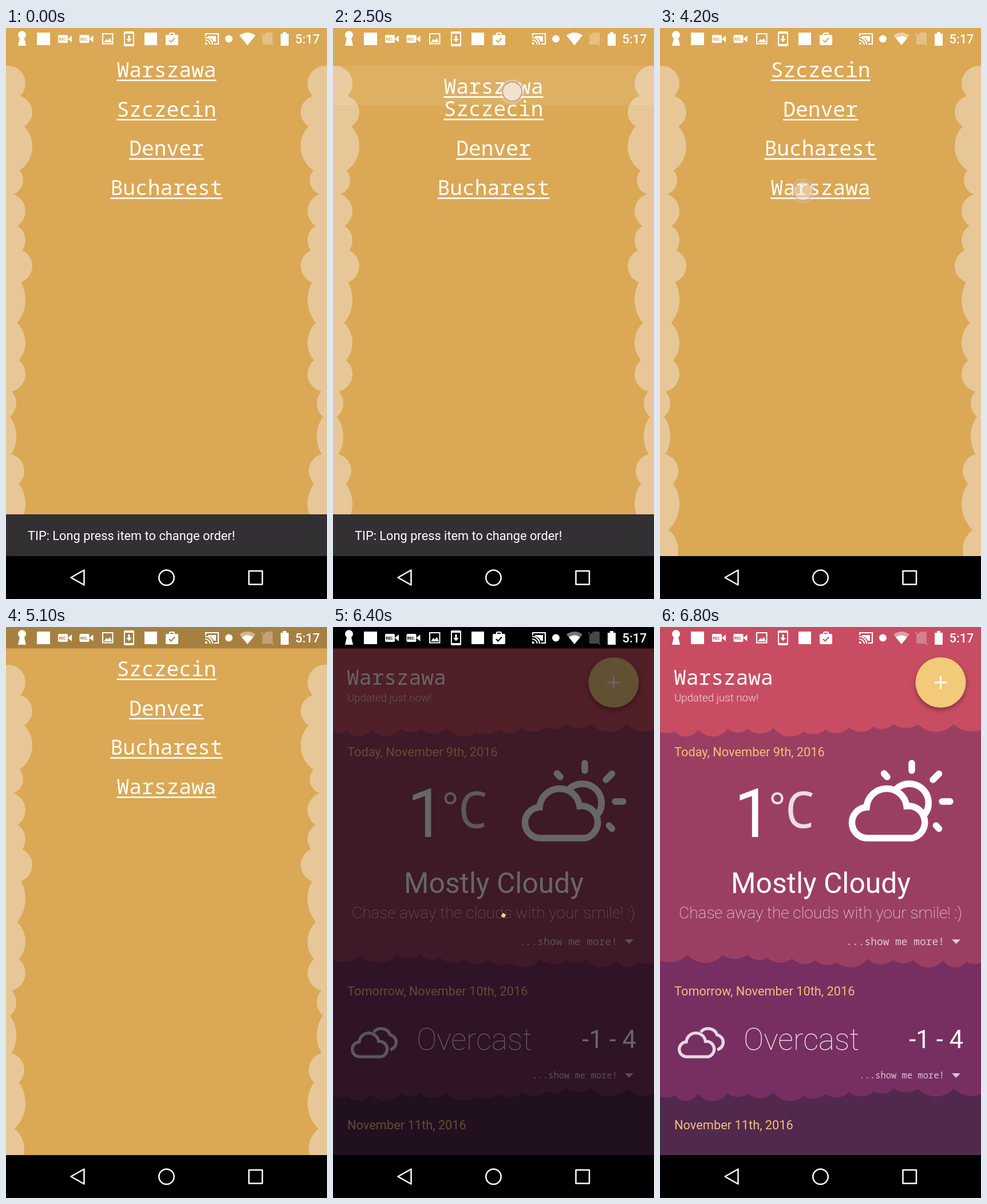
Recreate the animation shown at these times as an HTML page. Size 561 px wide and 998 px high, loop 6900 ms.

```html
<!DOCTYPE html>
<html lang="en">
<head>
<meta charset="utf-8">
<title>Reordering cities</title>
<style>
  html, body { margin: 0; width: 100%; height: 100%; overflow: hidden; background: #000; }
  svg { display: block; width: 100%; height: 100%; }
  text { font-family: Roboto, sans-serif; fill: #fff; white-space: pre; }
  .mono { font-family: "Noto Sans Mono", monospace; font-weight: 300; }
  .date { font-size: 21.8px; fill: #f0c178; }
  .more { text-anchor: end; opacity: .72; }
  .line { fill: none; stroke: #fff; }
  .rec { font: 700 6.5px Roboto, sans-serif; }
  .cut { fill: var(--bar); }
  .unit { font-weight: 400; text-anchor: middle; opacity: .82; }
  .fab { filter: drop-shadow(0 4px 4px rgba(0, 0, 0, .35)); }
</style>
</head>
<body>
<svg viewBox="0 0 561 998" preserveAspectRatio="none">
  <defs>
    <path id="cloud" d="M364 369A27 27 0 0 1 361 315A35.2 35.2 0 0 1 431 313A28.5 28.5 0 0 1 441 369Z"/>
    <g id="camera">
      <rect x="91" y="12" width="17" height="14" rx="2"/>
      <path d="M108 19L115 13V25Z"/>
      <text class="rec cut" x="92.3" y="21.5">REC.</text>
    </g>
    <radialGradient id="glow">
      <stop offset=".75" stop-color="#fff" stop-opacity=".45"/>
      <stop offset="1" stop-color="#fff" stop-opacity="0"/>
    </radialGradient>
  </defs>

  <g id="weather">
    <rect width="561" height="923" fill="#53284d"/>
    <g id="bands"></g>
    <text class="mono" x="24" y="101" font-size="36.2">Warszawa</text>
    <text x="25" y="130" font-size="18.7" font-weight="300" opacity=".78">Updated just now!</text>
    <g class="fab"><circle cx="490.5" cy="97" r="44" fill="#f3c97a"/></g>
    <path class="line" d="M479.5 97H501.5M490.5 86V108" stroke-width="3"/>

    <text class="date" x="25" y="226">Today, November 9th, 2016</text>
    <text x="129.5" y="367" font-size="118">1</text>
    <text class="mono unit" x="205" y="339" font-size="70">°</text>
    <text class="mono unit" x="245" y="351" font-size="88">C</text>
    <g class="line" stroke-width="11.5" stroke-linecap="round">
      <path d="M414 282A33.5 33.5 0 0 1 463 327"/>
      <path d="M440 238V251M391.5 256L397 262M477 267L487.5 256.5M493 305H507M482.5 347L487.5 352.5"/>
      <use href="#cloud" fill="#9b3f62"/>
    </g>
    <text x="281" y="465" font-size="49.8" text-anchor="middle">Mostly Cloudy</text>
    <text x="280.5" y="509" font-size="28.1" font-weight="100" text-anchor="middle" opacity=".9">Chase away the clouds with your smile! :)</text>
    <text class="mono more" x="497" y="556" font-size="17.9">...show me more!</text>
    <path d="M510 546H525L517.5 554Z" fill="#fff" opacity=".72"/>

    <text class="date" x="25" y="643.5">Tomorrow, November 10th, 2016</text>
    <g class="line" opacity=".82">
      <path d="M71 708A17 17 0 0 1 100 713A13 13 0 0 1 100 738.5" stroke-width="5.3"/>
      <use href="#cloud" transform="translate(-127.4 574) scale(.48)" stroke-width="11" fill="#772f61"/>
    </g>
    <text x="146" y="739" font-size="53" font-weight="100" opacity=".9">Overcast</text>
    <text x="530" y="735.5" font-size="43.6" text-anchor="end">-1 - 4</text>
    <text class="mono more" x="497" y="789" font-size="15.5">...show me more!</text>
    <path d="M510 780H525L517.5 788Z" fill="#fff" opacity=".72"/>
    <text class="date" x="25" y="877.5">November 11th, 2016</text>
    <rect id="scrollbar" x="555" y="183" width="6" height="619"/>
  </g>

  <rect id="dim" width="561" height="923"/>
  <rect id="loader" x="-3.3" y="-3.3" width="6.6" height="6.6" fill="#f6cc7c"/>

  <g id="list">
    <rect width="561" height="923" fill="#dba855"/>
    <g id="clouds" fill="#e7c797"></g>
    <g id="rows"></g>
    <g id="tip">
      <rect y="850" width="561" height="73" fill="#323032"/>
      <text x="38" y="895" font-size="21.8">TIP: Long press item to change order!</text>
    </g>
  </g>

  <rect id="bar" width="561" height="37.5"/>
  <g fill="#fff">
    <path d="M24 18A7 7 0 1 1 32 18L35 31H21Z"/>
    <rect x="54" y="8" width="23" height="22"/>
    <use href="#camera"/>
    <use href="#camera" x="37.5"/>
    <path class="line" d="M169 10H186.5V27.5H169Z" stroke-width="2"/>
    <path d="M171 25L175.5 19L178 22L181.5 17.5L185 25Z"/>
    <path fill-rule="evenodd" d="M208 6H222Q224 6 224 8V30Q224 32 222 32H208Q206 32 206 30V8Q206 6 208 6ZM208 10V28H222V10Z"/>
    <path d="M213.5 13H216.5V19H220L215 24.5L210 19H213.5Z"/>
    <rect x="242" y="8" width="22" height="22"/>
    <path fill-rule="evenodd" d="M281 12H285V10Q285 8 287 8H293Q295 8 295 10V12H299Q301 12 301 14V28Q301 30 299 30H281Q279 30 279 28V14Q279 12 281 12ZM287 10V12H293V10Z"/>
    <path class="line" d="M285 21L288.5 24.5L295 17.5" stroke-width="2" style="stroke:var(--bar)"/>
    <path class="line" d="M349 14V10H371V28H363.5M348 21A9 9 0 0 1 357 29M348 16.5A13 13 0 0 1 361 29" stroke-width="2.2"/>
    <path d="M348 25A4 4 0 0 1 352 29H348ZM353 14H367V24H363Q360 17 353 16Z"/>
    <circle cx="389.5" cy="19" r="6.5"/>
    <path id="wifi" d="M422 30L408 13Q422 3 436 13Z"/>
    <path d="M422 30L412 17.8Q422 10.5 432 17.8Z"/>
    <g opacity=".28">
      <path d="M455 8H466V29H448V15Z"/>
      <path class="line" d="M446 9L467 31" stroke-width="2"/>
    </g>
    <path d="M484 7H490V10H494V31H480V10H484Z"/>
    <text x="505.5" y="27" font-size="21.8" font-weight="500">5:17</text>
  </g>

  <rect y="923" width="561" height="75"/>
  <g class="line" stroke-width="2.5" stroke-linejoin="round">
    <path d="M113.5 960.5L136.5 947.5V973.5Z"/>
    <circle cx="280.5" cy="960.7" r="13.2"/>
    <rect x="424.5" y="949" width="23.5" height="23.5"/>
  </g>

  <g id="touch">
    <circle r="23" fill="url(#glow)"/>
    <circle r="17" fill="#f2e3cc" fill-opacity=".9" stroke="#b5a09a" stroke-width="2"/>
  </g>
</svg>
<script>
const $ = id => document.getElementById(id);
const LOOP = 6900, ROW = 68.7, TOP = 37, WIDTH = 561;
const clamp = v => Math.max(0, Math.min(1, v));
const ramp = (t, from, to) => clamp((t - from) / (to - from));
const smooth = v => v * v * (3 - 2 * v);

// Side clouds: [outer edge, centre y, radius], mirrored on the right.
const puffs = [[34, 97, 31], [46, 147, 29], [46, 207, 51], [30, 266, 26], [34, 320, 31],
  [34, 371, 30], [46, 416, 30], [34, 475, 64], [34, 550, 48], [34, 605, 31], [18, 656, 30],
  [18, 714, 60], [32, 774, 30], [34, 832, 63], [32, 912, 44]];
const half = puffs.map(([edge, y, r]) => `<circle cx="${edge - r}" cy="${y}" r="${r}"/>`).join('');
$('clouds').innerHTML = `<g>${half}</g><g transform="translate(${WIDTH}) scale(-1 1)">${half}</g>`;

// Scalloped band edge: [x, lowest y, radius].
const scallops = [[12, 186, 30], [45, 192, 24], [92, 192, 33], [136, 185, 27], [175, 187, 32],
  [228, 192, 36], [268, 188, 32], [308, 186, 30], [351, 184, 32], [388, 179, 26], [430, 177, 37],
  [482, 184, 42], [545, 183, 46]];
function band(color, drop, mirrored) {
  const bumps = scallops.map(([x, low, r]) =>
    `<circle cx="${mirrored ? WIDTH - x : x}" cy="${low - r + drop}" r="${r}"/>`).join('');
  return `<g fill="${color}"><rect width="${WIDTH}" height="${168 + drop}"/>${bumps}</g>`;
}
$('bands').innerHTML = band('#772f61', 636.5) + band('#9b3f62', 403, true) + band('#c84d63', -.5);

// The dragged city comes last so that it is painted on top.
const cities = ['Szczecin', 'Denver', 'Bucharest', 'Warszawa'];
$('rows').innerHTML = cities.map((name, i) => {
  const w = name.length * 10.9;
  return `<g id="row${i}">
    ${i === 3 ? `<rect id="lift" width="${WIDTH}" height="${ROW}" fill="#fff"/>` : ''}
    <text class="mono" x="280.5" y="49" font-size="36.3" text-anchor="middle">${name}</text>
    <path class="line" stroke-width="2.6" d="M${280.5 - w} 54.5H${280.5 + w}"/></g>`;
}).join('');

const moveTo = (id, x, y, extra = '') => $(id).setAttribute('transform', `translate(${x} ${y}) ${extra}`);
const fade = (id, value) => $(id).setAttribute('opacity', value);

function draw(t) {
  // Dragging: neighbours give way as the held row passes them.
  const pull = smooth(ramp(t, 2350, 3050));
  const drag = Math.min(3, pull * 244 / ROW);
  for (let i = 0; i < 3; i++) {
    moveTo('row' + i, 0, TOP + ROW * (i + 1 - smooth(clamp((drag - i - .4) / .6))));
  }
  moveTo('row3', 0, TOP + ROW * drag);
  fade('lift', .09 * ramp(t, 2350, 2450) * (1 - ramp(t, 3200, 3500)));
  moveTo('tip', 0, 73 * smooth(ramp(t, 2500, 2750)));

  const tap = t > 3800;
  if (tap) moveTo('touch', 250, 285);
  else moveTo('touch', 318 - 41 * pull, 82 + 244 * pull);
  fade('touch', tap ? ramp(t, 4140, 4250) * (1 - ramp(t, 4400, 4600))
    : t < 1700 ? 0 : (.7 + .3 * ramp(t, 1700, 1850)) * (1 - ramp(t, 3200, 3500)));

  fade('wifi', t < 4000 ? 1 : .45);

  // The list drops away and fades, showing the dimmed weather page.
  moveTo('list', 0, 80 * ramp(t, 5102, 5352) ** 4);
  fade('list', 1 - ramp(t, 5195, 5345));
  fade('scrollbar', .2 * (1 - ramp(t, 5400, 5700)));
  const reveal = ramp(t, 6420, 6780);
  fade('dim', .6 * (1 - reveal));
  const dark = ramp(t, 5070, 5200) * (1 - reveal);
  fade('bar', dark);
  const base = t < 5250 ? [219, 168, 85] : [200, 77, 99];
  document.body.style.setProperty('--bar', `rgb(${base.map(c => c * (1 - dark))})`);

  const turn = (t - 6400) / 800 * 2 * Math.PI + .27;
  moveTo('loader', 280 + 18.7 * Math.cos(turn), 499 + 18.7 * Math.sin(turn), `rotate(${turn * 180 / Math.PI + 15})`);
  fade('loader', t > 5450 && t < 6450 ? 1 : 0);
}

function tick() {
  draw(performance.now() % LOOP);
  requestAnimationFrame(tick);
}
tick();
</script>
</body>
</html>
```
